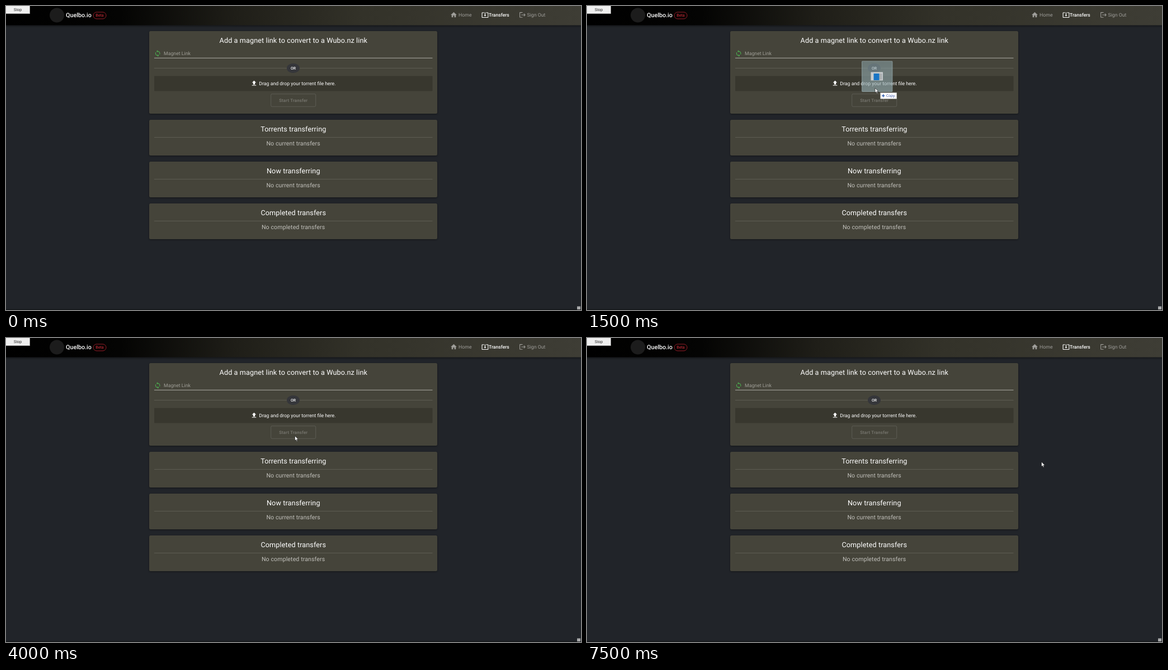
Write an HTML page that moves like this. It is 1028 px wide and 545 px high and loops after 8 s.

```html
<!DOCTYPE html>
<html lang="en">
<head>
<meta charset="utf-8">
<title>Transfers</title>
<style>
  html, body { margin: 0; width: 100%; height: 100%; overflow: hidden; background: #212429; }
  svg { display: block; }
  text { font: 8.75px Roboto, sans-serif; fill: #fff; text-rendering: geometricPrecision; }
  .mid { text-anchor: middle; }
  .title { font-size: 12.65px; letter-spacing: .0075em; }
  .note { font-size: 10.6px; letter-spacing: .0094em; fill: #c2c1bc; }
  .medium { font-weight: 500; }
  .card { fill: #45443a; filter: drop-shadow(0 1px 1.5px rgba(0, 0, 0, .4)); }
  .rule { stroke: #5d5c52; stroke-width: 1; }
  .white { fill: #fff; }
  .muted { fill: #9e9d99; }
</style>
</head>
<body>
<svg width="1028" height="545" viewBox="0 0 1028 545">
  <defs>
    <linearGradient id="bar">
      <stop offset="0" stop-color="#000"/>
      <stop offset=".2" stop-color="#040403"/>
      <stop offset=".4" stop-color="#1f1e18"/>
      <stop offset=".62" stop-color="#333229"/>
      <stop offset="1" stop-color="#3e3d35"/>
    </linearGradient>
    <linearGradient id="shade" x2="0" y2="1">
      <stop offset="0" stop-opacity=".4"/>
      <stop offset="1" stop-opacity="0"/>
    </linearGradient>
    <linearGradient id="glass" x2="0" y2="1">
      <stop offset="0" stop-color="#8aa3a8" stop-opacity=".55"/>
      <stop offset="1" stop-color="#9fb9be" stop-opacity=".6"/>
    </linearGradient>
    <path id="upload" d="M9 16h6v-6h4l-7-7-7 7h4zm-4 2h14v2H5z" transform="scale(.54) translate(-12 -12)"/>
  </defs>

  <rect width="1028" height="545" fill="#212429"/>
  <rect y="543.5" width="1028" height="1.5" fill="#15171a"/>
  <rect x="1021" y="538.5" width="6" height="5.5" fill="#a9aaab"/>

  <!-- Header -->
  <rect y="34" width="1028" height="5" fill="url(#shade)"/>
  <rect width="1028" height="34.5" fill="url(#bar)"/>
  <rect width="43" height="14" fill="#a0a0a0"/>
  <rect width="42" height="13.3" fill="#efefef"/>
  <text class="mid" x="21" y="9.3" style="font: 7px 'Liberation Sans', sans-serif; fill: #222">Stop</text>
  <circle cx="91" cy="16.5" r="13" fill="#1c1c1c"/>
  <text class="medium" x="107" y="20" style="font-size: 10.75px">Quelbo.io</text>
  <rect x="156" y="11" width="23" height="12" rx="6" fill="none" stroke="#a51f2b" stroke-width=".9"/>
  <text class="mid" x="167.5" y="19.3" style="font-size: 7.1px; fill: #dc2f3c">Beta</text>
  <path class="muted" transform="translate(794 9.5) scale(.54)" d="M10 20v-6h4v6h5v-8h3L12 3 2 12h3v8z"/>
  <text class="muted" x="809" y="19">Home</text>
  <path class="white" transform="translate(850 9.5) scale(.54)" d="M12 16.5l4-4h-3v-9h-2v9H8zm9-13h-6v2h6v14H3v-14h6v-2H3c-1.1 0-2 .9-2 2v14c0 1.1.9 2 2 2h18c1.1 0 2-.9 2-2v-14c0-1.1-.9-2-2-2z"/>
  <text x="863" y="19" class="medium" style="font-size: 8.6px">Transfers</text>
  <path class="muted" transform="translate(917 9.5) scale(.54)" d="M17 7l-1.4 1.4L18.2 11H8v2h10.2l-2.6 2.6L17 17l5-5zM4 5h8V3H4c-1.1 0-2 .9-2 2v14c0 1.1.9 2 2 2h8v-2H4z"/>
  <text class="muted" x="931.5" y="19">Sign Out</text>

  <!-- Form -->
  <rect class="card" x="256" y="45" width="515" height="148" rx="2.5"/>
  <text class="mid title" x="513.8" y="66.4">Add a magnet link to convert to a Wubo.nz link</text>
  <path fill="#4caf50" transform="translate(264.7 78.5) scale(.54)" d="M12 4V1L8 5l4 4V6c3.3 0 6 2.7 6 6 0 1-.25 2-.7 2.8l1.46 1.46C19.5 15 20 13.6 20 12c0-4.4-3.6-8-8-8zm0 14c-3.3 0-6-2.7-6-6 0-1 .25-2 .7-2.8L5.24 7.74C4.5 9 4 10.4 4 12c0 4.4 3.6 8 8 8v3l4-4-4-4z"/>
  <text x="282" y="87.7" style="fill: #9f9e97">Magnet Link</text>
  <path d="M265 93.3H762.5" stroke="#b9b8b2" stroke-width=".9"/>
  <path class="rule" d="M265 111.5H762.5"/>
  <rect x="502" y="103" width="23" height="17" rx="11.5" ry="8.5" fill="#35363a"/>
  <text class="mid medium" x="513.6" y="113.8" style="font-size: 6.9px">OR</text>
  <rect x="265" y="125.5" width="497.5" height="27" rx="1" fill="#38372e"/>
  <g id="prompt">
    <use href="#upload" x="443.5" y="138.5" class="white"/>
    <text x="452.3" y="141.6">Drag and drop your torrent file here.</text>
  </g>
  <g id="file">
    <use href="#upload" x="487.5" y="138.5" class="white"/>
    <text x="496.8" y="141.6">sintel.torrent</text>
  </g>
  <rect id="frame" x="473.7" y="157.7" width="80" height="22.6" rx="2" fill="#fff" stroke="#fff" stroke-width=".9"/>
  <text id="label" class="mid medium" x="513.7" y="171.6" style="font-size: 7.8px; letter-spacing: .028em">Start Transfer</text>

  <g id="panels"></g>

  <g id="toast">
    <rect x="12" y="536.5" width="114" height="30" rx="2.5" fill="#4a9a4e"/>
    <circle cx="26" cy="548.5" r="4.5" fill="none" stroke="#d8ead9"/>
  </g>

  <!-- Dragged file -->
  <g id="ghost">
    <rect x=".5" y=".5" width="54.5" height="54.5" rx="1" fill="url(#glass)" stroke="#a7bcc0" stroke-opacity=".55"/>
    <rect x="16.5" y="20" width="21.5" height="15" fill="#c9cdcf"/>
    <rect x="31.5" y="22.5" width="5" height="11" fill="#a9afb2"/>
    <rect x="21.5" y="22.5" width="10" height="12" fill="#1975c5"/>
    <rect x="33.7" y="57" width="29" height="10.8" fill="#fff" stroke="#b8b8b8" stroke-width=".5"/>
    <path d="M36 62.4h5.4M38.7 59.7v5.4" stroke="#1d4fa8" stroke-width="1.3"/>
    <text x="44" y="64.7" style="font: 6.5px 'Open Sans', sans-serif; fill: #1f3f9c">Copy</text>
  </g>

  <path id="arrow" d="M0 0V8.6L2 6.8 3.3 9.9 4.7 9.3 3.4 6.3H6.1Z" fill="#fff" stroke="#111" stroke-width=".6"/>
  <path id="hand" d="M-1 .8Q0-.6 1 .8V5Q3 4.6 5.5 6V9.5L4.5 13H-1L-4 8.5Q-3.5 7-1 8.5Z" fill="#fff" stroke="#111" stroke-width=".6"/>
</svg>
<script>
const LOOP = 8000;
const $ = id => document.getElementById(id);

const panels = [
  ["Torrents transferring", "No current transfers"],
  ["Now transferring", "No current transfers"],
  ["Completed transfers", "No completed transfers"]
];
$("panels").innerHTML = panels.map(([title, note], i) => `
  <g transform="translate(0 ${204 + 75 * i})">
    <rect class="card" x="256" width="515" height="64" rx="2.5"/>
    <text class="mid title" x="513.8" y="21.3">${title}</text>
    <path class="rule" d="M265 31.5H762.5"/>
    <text class="mid note" x="513.6" y="46.4">${note}</text>
  </g>`).join("");

// Each track lists [start time, ...values]; values hold until the next entry.
const tracks = {
  arrow: [[0], [1000, 643, 155], [1250, 561, 154], [1500, 515, 147], [1750, 498, 139],
          [2000, 497, 138], [2250, 499, 139], [2750, 608, 225], [3000, 614, 217], [3250],
          [3750, 516.5, 175.5], [4250, 680, 203], [4500, 789, 211], [5000, 812.5, 222]],
  hand: [[0], [3250, 550, 178.5], [3500, 517, 174.5], [3750]],
  ghost: [[0], [1000, 704, 105], [1250, 537, 105], [1500, 491, 98.5], [1750, 474.5, 90.5],
          [2000, 473, 89], [2250]],
  enabled: [[0, 0], [2250, .06], [2500, 1], [3750, .4], [4000, 0]],
  hover: [[0, 0], [3500, .1], [3750, .03], [4000, 0]],
  toast: [[0, 0, 1], [4500, .3, .75], [4750, 1, 1], [6500, 0, 1]]
};
const at = (name, t) => tracks[name].findLast(key => key[0] <= t).slice(1);

function place(id, t) {
  const [x, y] = at(id, t);
  $(id).style.display = x === undefined ? "none" : "";
  if (x !== undefined) $(id).setAttribute("transform", `translate(${x} ${y})`);
}

function draw(t) {
  ["arrow", "hand", "ghost"].forEach(id => place(id, t));

  const dropped = t >= 2250 && t < 3750;
  $("file").style.display = dropped ? "" : "none";
  $("prompt").style.display = dropped ? "none" : "";

  const [enabled] = at("enabled", t);
  $("label").style.opacity = .28 + .72 * enabled;
  $("frame").style.strokeOpacity = .14 + .8 * enabled;
  $("frame").style.fillOpacity = at("hover", t)[0];

  const [opacity, scale] = at("toast", t);
  $("toast").style.opacity = opacity;
  $("toast").setAttribute("transform", `translate(69 551) scale(${scale}) translate(-69 -551)`);
}

const start = performance.now();
function tick() {
  draw((performance.now() - start) % LOOP);
  requestAnimationFrame(tick);
}
tick();
</script>
</body>
</html>
```
